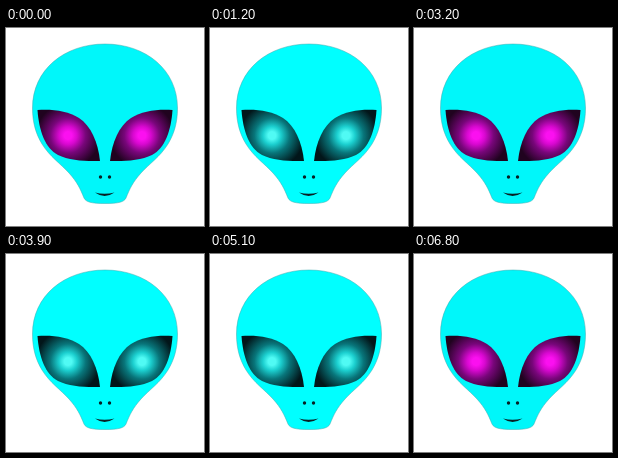
Animation of 198x198 px, one loop 7000 ms. Source, as an HTML page:

```html
<!DOCTYPE html>
<html lang="en">
<head>
<meta charset="utf-8">
<title>Alien</title>
<style>
  html, body { margin: 0; width: 100%; height: 100%; overflow: hidden; background: #fff; }
  svg { display: block; width: 100vw; height: 100vh; --skin: #00f7fa; --core: #fb10f0; --glow: #d808d0; --mid: #78067a; --rim: #20031f; }
  svg.teal { --skin: #00ffff; --core: #50faf4; --glow: #1cd0d0; --mid: #08757a; --rim: #02161a; }
  .core { stop-color: var(--core); }
  .glow { stop-color: var(--glow); }
  .mid { stop-color: var(--mid); }
  .rim { stop-color: var(--rim); }
</style>
</head>
<body>
<svg id="alien" viewBox="0 0 198 198">
  <defs>
    <radialGradient id="iris" gradientUnits="userSpaceOnUse" cx="62" cy="107.500" r="32">
      <stop class="core" offset=".12"/>
      <stop class="glow" offset=".28"/>
      <stop class="mid" offset=".55"/>
      <stop class="rim" offset="1"/>
    </radialGradient>
    <path id="eye" fill="url(#iris)"
      d="M31.500 82C47 81 62 83 73 90C85 98 92 114 94 133C80 133.500 63 132.500 52 127C39 120 33 103 31.500 82Z"/>
  </defs>
  <path fill="var(--skin)" stroke="#3fa9ad" stroke-width=".5"
    d="M99 16C58 16 26.500 42 26.500 80C26.500 95 30 106 36 116C44 129 55 136 63 145C71 154 74 160 78 170C80 174 85 175.500 99 175.500C113 175.500 118 174 120 170C124 160 127 154 135 145C143 136 154 129 162 116C168 106 171.500 95 171.500 80C171.500 42 140 16 99 16Z"/>
  <use href="#eye"/>
  <use href="#eye" transform="matrix(-1 0 0 1 198 0)"/>
  <g fill="#082024">
    <circle cx="94.500" cy="149" r="1.700"/>
    <circle cx="103.500" cy="149" r="1.700"/>
    <path d="M89 164.500Q98.500 167 108.500 164.500Q98.500 171.500 89 164.500Z"/>
  </g>
</svg>
<script>
  const LOOP = 7000, STEP = 100;
  // The eye colour flips on every step inside these spans (ms, inclusive).
  const FLICKER = [[100, 200], [400, 2500], [3500, 5900], [6600, 6800]];
  const alien = document.getElementById("alien");

  function flips(t) {
    return FLICKER.reduce((sum, [from, to]) =>
      sum + (t < from ? 0 : Math.floor((Math.min(t, to) - from) / STEP) + 1), 0);
  }

  function draw(now) {
    alien.classList.toggle("teal", flips(now % LOOP) % 2 === 1);
    requestAnimationFrame(draw);
  }
  draw(performance.now());
</script>
</body>
</html>
```
